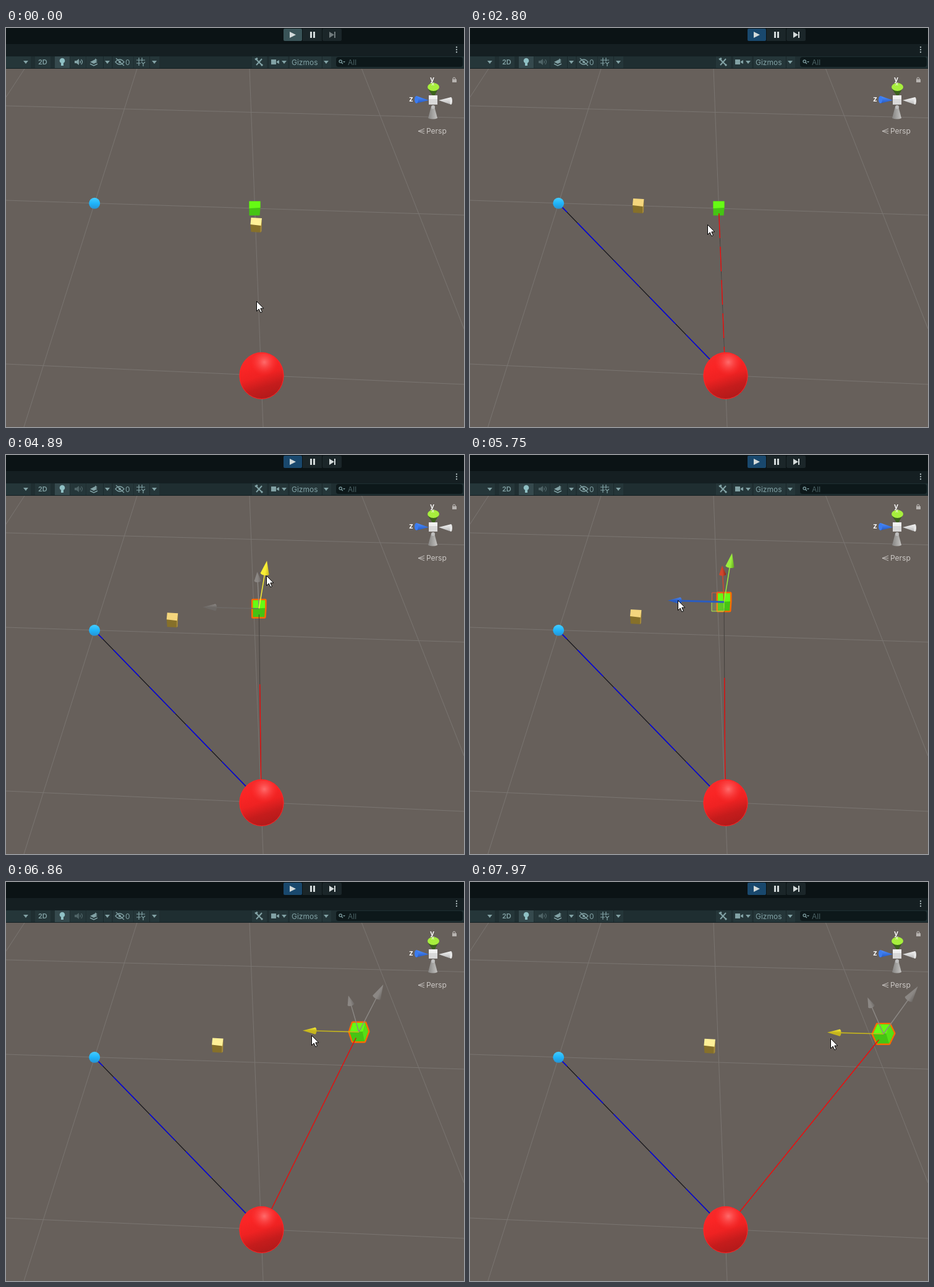
An HTML page with a canvas that plays this animation: 741x646 px, repeating every 8 s.

```html
<!DOCTYPE html>
<html lang="en">
<head>
<meta charset="utf-8">
<title>Scene view</title>
<style>
  html, body { margin: 0; width: 100%; height: 100%; overflow: hidden; background: #67605b; }
  canvas { display: block; }
</style>
</head>
<body>
<canvas id="stage" width="741" height="646"></canvas>
<script>
const ctx = document.getElementById('stage').getContext('2d');
const LOOP = 8000, STEP = 120;

// Runs of picture changes: start time, number of steps.
const RUNS = [[0, 1], [500, 1], [1820, 1], [2070, 1], [2320, 7], [3180, 1], [3430, 7], [4270, 4],
  [4770, 5], [5390, 4], [6000, 2], [6260, 7], [7130, 7], [7970, 1]];
const LIFT = [[4270, 0], [4630, .37], [5010, 1]];
const CUBE_X = [[6120, 411], [6260, 428], [6860, 571], [6980, 605], [7370, 706], [7490, 729],
  [7610, 736], [7730, 727], [7850, 703], [7970, 669]];
const CURSOR_X = [[2320, 404], [2800, 384], [3040, 393], [3180, 401], [4270, 413], [5010, 422],
  [5130, 414], [5250, 398], [5750, 336]];
const CURSOR_Y = [[2320, 442], [2800, 318], [3040, 295], [3180, 296], [4270, 239], [4630, 217],
  [5010, 185], [5130, 200], [5250, 216], [5750, 235]];

function held(t) {
  const [start, count] = RUNS.filter(run => run[0] <= t).pop();
  return start + STEP * Math.min(count - 1, Math.floor((t - start) / STEP));
}

function at(keys, t) {
  const i = keys.findIndex(key => key[0] > t);
  if (i === 0) return keys[0][1];
  if (i < 0) return keys[keys.length - 1][1];
  const [t0, a] = keys[i - 1], [t1, b] = keys[i];
  return a + (b - a) * (t - t0) / (t1 - t0);
}

function fill(color, path) {
  ctx.fillStyle = color;
  ctx.fill(new Path2D(path));
}

function stroke(color, width, path, dash = []) {
  ctx.strokeStyle = color;
  ctx.lineWidth = width;
  ctx.setLineDash(dash);
  ctx.stroke(new Path2D(path));
  ctx.setLineDash([]);
}

function rect(color, x, y, w, h, r = 0) {
  ctx.fillStyle = color;
  ctx.beginPath();
  ctx.roundRect(x, y, w, h, r);
  ctx.fill();
}

function oval(color, x, y, rx, ry = rx, turn = 0) {
  ctx.fillStyle = color;
  ctx.beginPath();
  ctx.ellipse(x, y, rx, ry, turn, 0, 7);
  ctx.fill();
}

function text(label, x, y, color, font) {
  ctx.fillStyle = color;
  ctx.font = font + ' Inter, sans-serif';
  ctx.fillText(label, x, y);
}

const poly = points => 'M' + points.join('L') + 'Z';

function shade(x0, y0, x1, y1, ...colors) {
  const g = ctx.createLinearGradient(x0, y0, x1, y1);
  colors.forEach((c, i) => g.addColorStop(i / (colors.length - 1), c));
  return g;
}

function drawPlayBar(t) {
  const playing = t >= 2070;
  rect('#0b1315', 0, 0, 741, 27);
  rect('#151f22', 0, 26, 741, 19);
  rect(playing ? '#19486d' : '#3a5458', 449, 1, 30, 20, 2);
  rect('#1b2629', 480, 1, 31, 20);
  rect('#1b2629', 512, 1, 31, 20, 2);
  fill('#d3dada', 'M459 6L469 11L459 16ZM492 6h3v10h-3ZM497 6h3v10h-3Z');
  fill(playing ? '#d3dada' : '#707a7c', 'M523 6L531 11L523 16ZM531 6h2v10h-2Z');
  for (const y of [31, 35, 39]) oval('#a3b1b3', 729, y, 1.2);
}

function drawToolbar(t) {
  const ink = '#82a2a5';
  rect('#1f2e31', 0, 45, 741, 21);
  rect('#142023', 0, 45, 741, 1);
  rect('#142023', 0, 65, 741, 1);
  for (const [x, w] of [[0, 40], [47, 25], [79, 24], [104, 25], [130, 41], [173, 33], [207, 41],
    [398, 24], [426, 30], [459, 67]]) rect('#253639', x, 46, w, 19);
  rect('#35494d', 79, 46, 24, 19);
  for (const x of [157, 232, 511]) rect('#1a282b', x, 46, 1, 19);
  for (const x of [32, 164, 240, 450, 518]) fill(ink, `M${x - 4} 53h8l-4 5Z`);

  text('2D', 52, 59, ink, '600 11px');
  oval('#8fc0c4', 91, 53, 4.3);
  rect('#8fc0c4', 89, 57, 4, 4);

  const sound = t < 1820 ? ink : '#4e6366';
  fill(sound, 'M111 53h3l4-3v10l-4-3h-3Z');
  stroke(sound, 1.2, 'M119.5 53q2 2 0 4M121.5 51q4 4 0 8');

  fill(ink, 'M136 55l6-3 6 3-6 3ZM145 49l1 2 2 1-2 1-1 2-1-2-2-1 2-1Z');
  stroke(ink, 1.5, 'M136 58l6 3 6-3');
  stroke(ink, 1.3, 'M177 55q7-8 14 0q-7 8-14 0ZM178 49l13 12');
  oval(ink, 184, 55, 2);
  text('0', 193, 60, ink, '12px');
  stroke(ink, 1.2, 'M215 48v13M220 48v6M211 52h14M211 57h7M219 55l3 3 3-3M222 58v4');

  stroke(ink, 2, 'M405 60l9-10M404 50l10 10');
  stroke(ink, 3, 'M403 51l4-2M413 59l2 2');
  fill(ink, 'M429 51h8v8h-8ZM438 54l4-2v6l-4-2Z');
  text('Gizmos', 462, 60, ink, '12px');

  rect('#0d181a', 534, 47, 205, 16, 4);
  stroke('#82a2a5', 1.2, 'M539 54a2.2 2.2 0 1 0 4.4 0a2.2 2.2 0 1 0 -4.4 0M543 56l2 2');
  fill(ink, 'M545 54h4l-2 2Z');
  text('All', 553, 60, '#4c6265', '12px');
}

function drawCompass() {
  fill('#3c611e', 'M683 99L699 99L692 112Z');
  oval('#a7ef3d', 691.5, 95.5, 9.5, 6.5);
  fill(shade(0, 111, 0, 123, '#4b8cff', '#2054bd'), 'M664 110L684 117L664 122Z');
  oval('#3b7cf0', 664, 116, 3, 6);
  fill(shade(0, 112, 0, 124, '#f5f5f5', '#b5b5b5'), 'M700 117L720 112L720 124Z');
  oval('#e7e7e7', 720, 118, 2, 6);
  fill(shade(683, 0, 698, 0, '#868583', '#c3c2c0'), 'M688 127L693 127L698 146Q691 149 683 146Z');
  rect('#d9d9d9', 684, 109, 14, 15);
  rect('#f0f0f0', 684, 109, 14, 6);
  oval('#bdbdbd', 691, 128, 3);
  text('y', 686, 87, '#fff', '600 12px');
  text('x', 688, 93, '#e8f5d0', '600 9px');
  text('z', 652, 119, '#fff', '600 12px');
  rect('#b7b3b0', 722, 83, 7, 5);
  stroke('#b7b3b0', 1.2, 'M723 83v-1q2-4 4 0v1');
  stroke('#c5c1be', 1, 'M677 163l-10 4 10 4M667 167h10');
  text('Persp', 680, 171, '#cbc7c4', '12px');
}

function drawGround() {
  rect('#67605b', 0, 66, 741, 580);
  stroke('#7a7571', 1, 'M30 66L0 112M212 66L29 646M394 66L416 646M575.5 66L741 487' +
    'M0 126L741 145.5M0 279L741 303M0 544L741 577');
}

function drawSpheres() {
  oval(shade(0, 275, 0, 293, '#45ccff', '#1fb4fa', '#2792d2'), 143.2, 283.8, 9);
  oval(shade(400, 526, 424, 600, '#f62a2a', '#fa2525', '#ef2222', '#c51c1c', '#b01a1a'), 413.5, 563, 36, 38);
  const glow = ctx.createRadialGradient(418, 541, 1, 418, 541, 22);
  glow.addColorStop(0, 'rgba(255,125,125,.75)');
  glow.addColorStop(1, 'rgba(255,60,60,0)');
  oval(glow, 416, 545, 24, 18);
  stroke('#fb2a2a', 1, 'M378 563a35.5 37.5 0 1 0 71 0a35.5 37.5 0 1 0 -71 0');
}

function drawYellowCube(x, y, top) {
  const p = (dx, dy) => [x + dx, y + dy];
  fill('#86702a', poly([p(-9, -2), p(9, -2), p(8, 12), p(-8, 11)]));
  fill('#a58a3c', poly([p(7, 1), p(9.5, -9), p(9, 10), p(7, 12)]));
  fill(top, poly([p(-8, -12), p(9.5, -11), p(8, 1), p(-9, -1)]));
}

function drawGreenCube(x, y, lift, turn, selected) {
  const p = (dx, dy) => [x + dx, y + dy];
  const h = 11.5 + 2.5 * lift + turn, w = 9 + lift + 5 * turn, n = 9 + lift;
  const hull = poly([p(-n, -h), p(n, -h), p(w, -1), p(n - 1, h), p(-n, h), p(-w, 0)]);
  if (selected) {
    ctx.lineJoin = 'round';
    stroke('#ff6a00', 5, hull);
    ctx.lineJoin = 'miter';
  }
  fill('#45c413', hull);
  fill('#66fb14', poly([p(-n, -h), p(n, -h), p(w - 7 * turn, -1), p(-w, 0)]));
  if (turn > 0) fill('#55df16', poly([p(n, -h), p(w, -1), p(n - 1, h), p(w - 9 * turn, 0)]));
}

function drawArrow(x, y, dx, dy, color, dark, half, neck, width) {
  const len = Math.hypot(dx, dy), nx = -dy / len * half, ny = dx / len * half;
  const bx = x + dx * neck, by = y + dy * neck;
  stroke(color, width, `M${x} ${y}L${bx} ${by}`);
  const tone = shade(bx - nx, by - ny, bx + nx, by + ny, color, color, dark);
  oval(tone, bx, by, half, 2.5, Math.atan2(ny, nx));
  fill(tone, poly([[bx - nx, by - ny], [x + dx, y + dy], [bx + nx, by + ny]]));
}

function drawHandles(t, x, y, lift, shift) {
  const axis = t > 4270 && t <= 5010 ? 'y' : t >= 6000 ? 'z' : '';
  const paint = (name, color, dark) => !axis ? [color, dark]
    : axis === name ? ['#f8ee35', '#c5b51d'] : ['#8b8784', '#6d6966'];
  const hoverY = t >= 4150 && t <= 4270, hoverZ = t >= 5500 && t < 6000;
  if (!axis) {
    ctx.fillStyle = 'rgba(190,220,110,.2)';
    ctx.fillRect(x - 20, y, 20, 15);
    stroke('#d65a3c', 1, `M${x - 19.5} ${y - 15}h19v15h-19Z`);
    stroke('#a8e84c', 1, `M${x - 20} ${y}h20v15h-20Z`);
  }
  drawArrow(x, y, -2 - lift - shift * .088, -62 + 3 * lift, ...paint('x', '#d0452c', '#8e2514'), 5.5, .76, 1.5);
  drawArrow(x, y, 12 + lift + shift * .165, -71 - 8 * lift + Math.min(2, shift * .02),
    ...paint('y', '#9aee3c', '#5fa31e'), 7, .73, hoverY ? 2.5 : 1.5);
  drawArrow(x, y, -90 - lift, -2.5, ...paint('z', '#4a86f2', '#2a5cc0').reverse(), 5.5, .78, hoverZ ? 3 : 1.7);
}

function redDash(t) {
  if (t < 4390) return [40, 14];
  if (t < 6260) return [0, 113, 400];
  if (t >= 7130 && t < 7970) return [0, 73, 202, 83, 100];
  return [];
}

function drawCursor(x, y) {
  const shape = `M${x + .5} ${y + .5}v16l3.7-3.5 2.6 5.8 2.6-1.1-2.6-5.7h5Z`;
  fill('#fff', shape);
  stroke('#000', 1, shape);
}

function draw(time) {
  const t = held(time);
  const lift = at(LIFT, t), dragged = at(CUBE_X, t), shift = dragged - 411;
  const x = dragged - 8.5 * (1 - lift), y = 292 - 54 * lift + shift * .031;
  const running = t >= 1820, selected = t >= 3430;

  drawGround();
  if (running) {
    stroke('#17171c', 1.2, 'M147 288L413 562');
    stroke('#0000f5', 1.4, 'M148 289L413 562', [13, 24, 60, 24, 60, 24, 60, 24, 60, 24]);
    drawYellowCube(272 - 4 * lift + shift * .463, 288 - 26 * lift + shift * .015,
      shift > 0 ? '#fff097' : '#f4d67d');
  } else {
    drawYellowCube(404.5, 319, '#fff097');
  }
  drawGreenCube(x, y, lift, Math.min(1.4, shift / 160), selected);
  if (running) {
    const line = `M${x + (413 - x) * .03} ${y + (563 - y) * .03}L413 563`;
    stroke('#44403d', 1, line);
    stroke('#fa0808', 1.3, line, redDash(t));
  }
  drawSpheres();
  drawCompass();
  if (selected) drawHandles(t, x, y, lift, shift);
  drawPlayBar(t);
  drawToolbar(t);

  if (t < 500) drawCursor(405, 442);
  else if (t >= 6260) drawCursor(t >= 7970 ? 583 : dragged - 77, t >= 7970 ? 253 : 247 + shift * .006);
  else if (t >= 2320) drawCursor(Math.round(at(CURSOR_X, t)), Math.round(at(CURSOR_Y, t)));
}

function tick() {
  draw(performance.now() % LOOP);
  requestAnimationFrame(tick);
}
tick();
</script>
</body>
</html>
```
